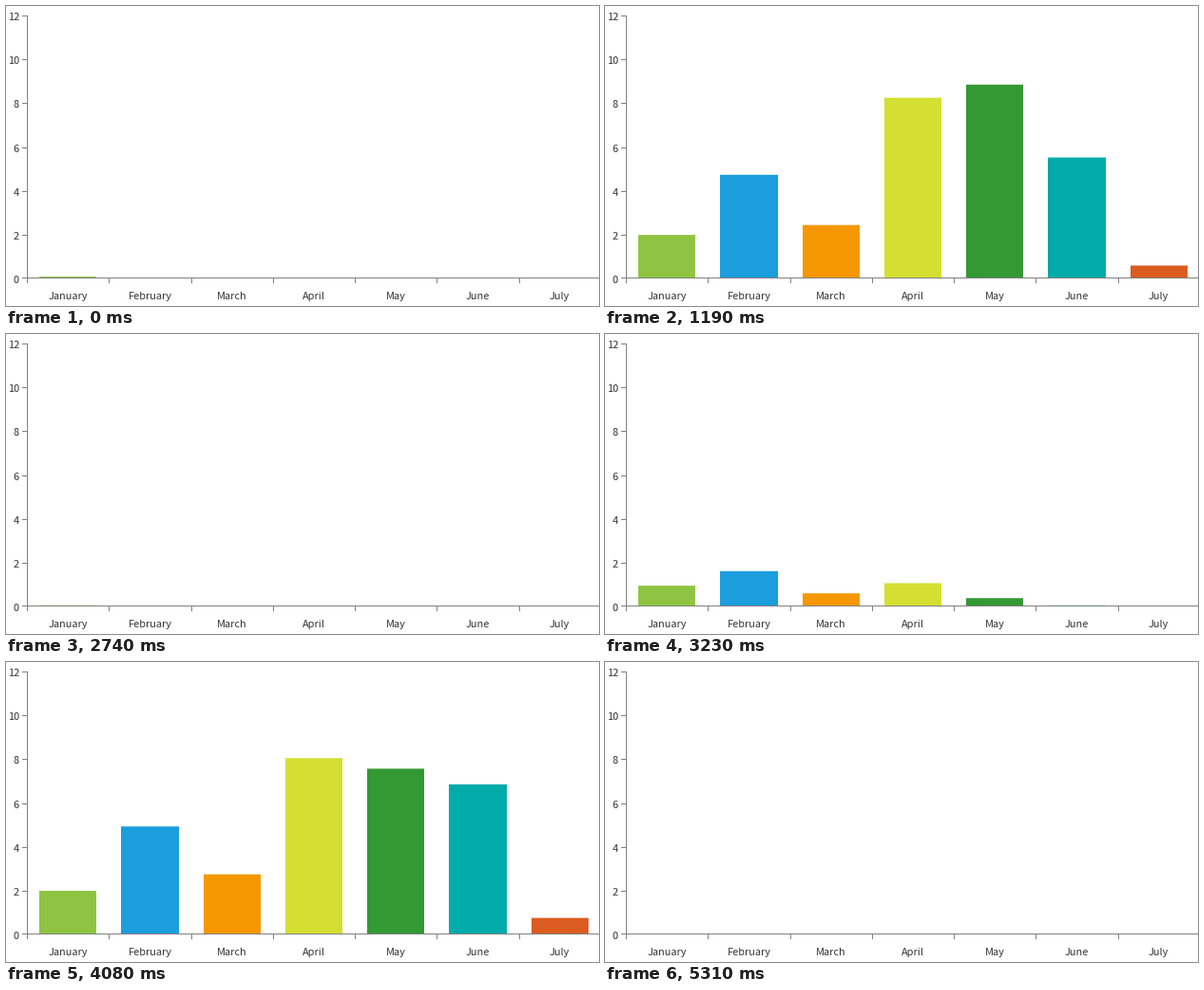
A matplotlib script that plays this animation: 624x316 px, repeating every 5.41 s.

```python
import numpy as np
import matplotlib.pyplot as plt
from matplotlib.animation import FuncAnimation
from matplotlib.patches import Rectangle

W, H, DPI = 624, 316, 100
LOOP, TICK = 5410, 10
AXIS_X, AXIS_Y = 22, 286
BASE, UNIT = 287, 277 / 12
STEP = 86.28
GREY, INK = "#808080", "#333333"

MONTHS = ["January", "February", "March", "April", "May", "June", "July"]
VALUES = [2, 5, 3, 10, 9, 7, 1]
COLORS = ["#8EC441", "#1B9DDE", "#F59700", "#D4DF32",
          "#339933", "#00ABA9", "#DC5B20"]

# Two runs of the chart: (first bar's start, duration of each bar) in ms
RUNS = [(-190, 1384), (2583, 1406)]
STAGGER = 0.0807
BOUNCES, BOUNCINESS = 3, 5

# Moments at which the picture is refreshed
REFRESH = np.concatenate([
    [0], np.arange(20, 1671, 30), np.arange(1710, 1891, 30), [2510],
    np.round(np.linspace(2740, 3260, 18), -1),
    np.round(np.linspace(3290, 3810, 18), -1),
    np.arange(3840, 4681, 30), [5310],
])


def bounce_out(p):
    """Ease from 0 to 1 that falls into place and rebounds ever smaller."""
    if p <= 0:
        return 0.0
    if p >= 1:
        return 1.0
    widths = [BOUNCINESS ** k for k in range(BOUNCES + 1)]
    left = (1 - p) * (sum(widths[:-1]) + widths[-1] / 2)
    for k, width in enumerate(widths):
        if left < width:
            v = left / width
            return 1 - 4 * v * (1 - v) * BOUNCINESS ** (k - BOUNCES)
        left -= width
    return 0.0


def bar_top(i, t):
    if 2510 <= t < 2740 or t >= 5310:
        return BASE
    start, duration = RUNS[t >= 2510]
    p = (t - start) / duration - i * STAGGER
    top = BASE - VALUES[i] * UNIT * bounce_out(p)
    return round(top) if p >= 1 else top


fig = plt.figure(figsize=(W / DPI, H / DPI), dpi=DPI, facecolor="white")
ax = fig.add_axes([0, 0, 1, 1])
ax.set_xlim(0, W)
ax.set_ylim(H, 0)
ax.axis("off")


def box(x, y, w, h, color, z=1):
    patch = Rectangle((x, y), w, h, facecolor=color, linewidth=0,
                      snap=False, zorder=z)
    ax.add_patch(patch)
    return patch


def label(x, y, text, align):
    ax.text(x, y, text, ha=align, va="baseline", color=INK,
            family="Noto Sans CJK JP", fontsize=11 * 72 / DPI)


bars = []
for i, (month, color) in enumerate(zip(MONTHS, COLORS)):
    x0 = round(34.95 + i * STEP)
    x1 = round(95.25 + i * STEP)
    bars.append(box(x0, BASE, x1 - x0, 0, color))
    box(round(AXIS_X + i * STEP), AXIS_Y, 1, 6, GREY, 2)
    label(AXIS_X + (i + 0.5) * STEP, 309, month, "center")

box(AXIS_X, 10, 1, AXIS_Y - 10, GREY, 2)
box(17, AXIS_Y, W - 17, 1, GREY, 2)
for value in range(0, 13, 2):
    y = int(BASE - value * UNIT + 0.5)
    if value:
        box(17, y, 5, 1, GREY, 2)
    label(14, y + 5, str(value), "right")


def update(frame):
    now = frame * TICK
    t = REFRESH[np.searchsorted(REFRESH, now, side="right") - 1]
    for i, bar in enumerate(bars):
        top = bar_top(i, t)
        bar.set_y(top)
        bar.set_height(BASE - top)
    return bars


anim = FuncAnimation(fig, update, frames=LOOP // TICK, interval=TICK,
                     repeat=True, repeat_delay=0, blit=False)
plt.show()
```
